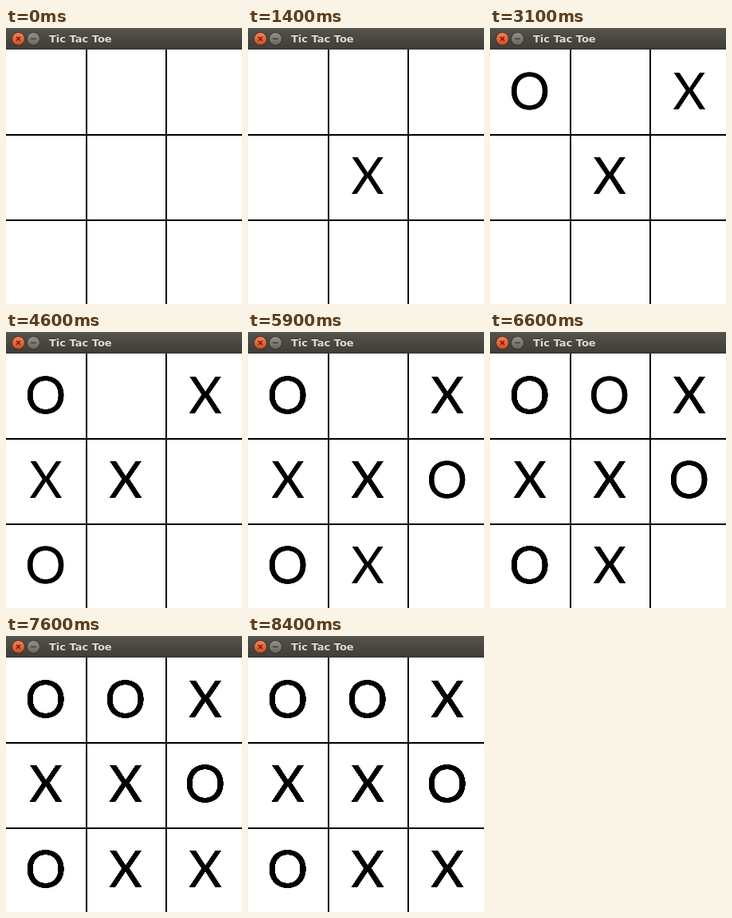
An HTML page with a canvas for the animation above (8500 ms loop, 296 by 346 pixels).

```html
<!DOCTYPE html>
<html lang="en">
<head>
<meta charset="utf-8">
<title>Tic Tac Toe</title>
<style>
  html, body { margin: 0; width: 100%; height: 100%; overflow: hidden; background: #fff; }
  .bar {
    position: absolute; left: 0; top: 0; width: 296px; height: 27px;
    background: linear-gradient(#5a5950 0, #53524a 2px, #3e3d38 26px, #33322e 26px);
  }
  .bar svg { position: absolute; left: 0; top: 0; }
  .bar span {
    position: absolute; left: 54px; top: 6px; white-space: nowrap;
    font: bold 13px/16px "DejaVu Sans", sans-serif; color: #dfdbd2;
    text-shadow: 0 -1px #33322e;
  }
  canvas { position: absolute; left: 0; top: 27px; }
</style>
</head>
<body>
<div class="bar">
  <svg width="50" height="27" viewBox="0 0 50 27">
    <defs>
      <linearGradient id="close" x2="0" y2="1">
        <stop stop-color="#f58159"/><stop offset="1" stop-color="#dc4a1c"/>
      </linearGradient>
      <linearGradient id="min" x2="0" y2="1">
        <stop stop-color="#929087"/><stop offset="1" stop-color="#696760"/>
      </linearGradient>
    </defs>
    <g stroke="#32312d">
      <circle cx="15.5" cy="13.5" r="8" fill="url(#close)"/>
      <circle cx="34.5" cy="13.5" r="8" fill="url(#min)"/>
    </g>
    <path d="M13 11l5 5m0-5l-5 5" stroke="#5a2410" stroke-width="1.5"/>
    <path d="M31 13.5h7" stroke="#3c3b37" stroke-width="1.4"/>
  </svg>
  <span>Tic Tac Toe</span>
</div>
<canvas id="board" width="296" height="319"></canvas>
<script>
const LOOP = 8500;
const ctx = document.getElementById('board').getContext('2d');
const baselines = [75, 181, 288];

// time, column, row; X and O take turns
const moves = [
  [1400, 1, 1], [2200, 0, 0], [3100, 2, 0], [3800, 0, 2], [4600, 0, 1],
  [5200, 2, 1], [5900, 1, 2], [6500, 1, 0], [7000, 2, 2]
];

// The board is repainted without clearing, so mark edges darken each time
const paints = moves.map(m => m[0]).concat(6600);
for (let t = 7100; t < LOOP; t += 100) paints.push(t);
paints.sort((a, b) => a - b);

function drawMarks(time) {
  moves.forEach(([start, col, row], i) => {
    if (start > time) return;
    const cross = i % 2 === 0;
    ctx.fillText(cross ? 'X' : 'O', col * 100 + (cross ? 50 : 49.6), baselines[row]);
  });
}

function drawBoard(time) {
  ctx.fillStyle = '#fff';
  ctx.fillRect(0, 0, 296, 319);
  ctx.fillStyle = '#000';
  for (const x of [100, 200]) ctx.fillRect(x, 0, 2, 319);
  for (const y of [106, 213]) ctx.fillRect(0, y, 296, 2);
  ctx.font = '64px Lato, sans-serif';
  ctx.textAlign = 'center';
  for (const t of paints) if (t <= time) drawMarks(t);
}

let shown = -1;
function tick() {
  const time = performance.now() % LOOP;
  const count = paints.filter(t => t <= time).length;
  if (count !== shown) {
    drawBoard(time);
    shown = count;
  }
  requestAnimationFrame(tick);
}
tick();
</script>
</body>
</html>
```
